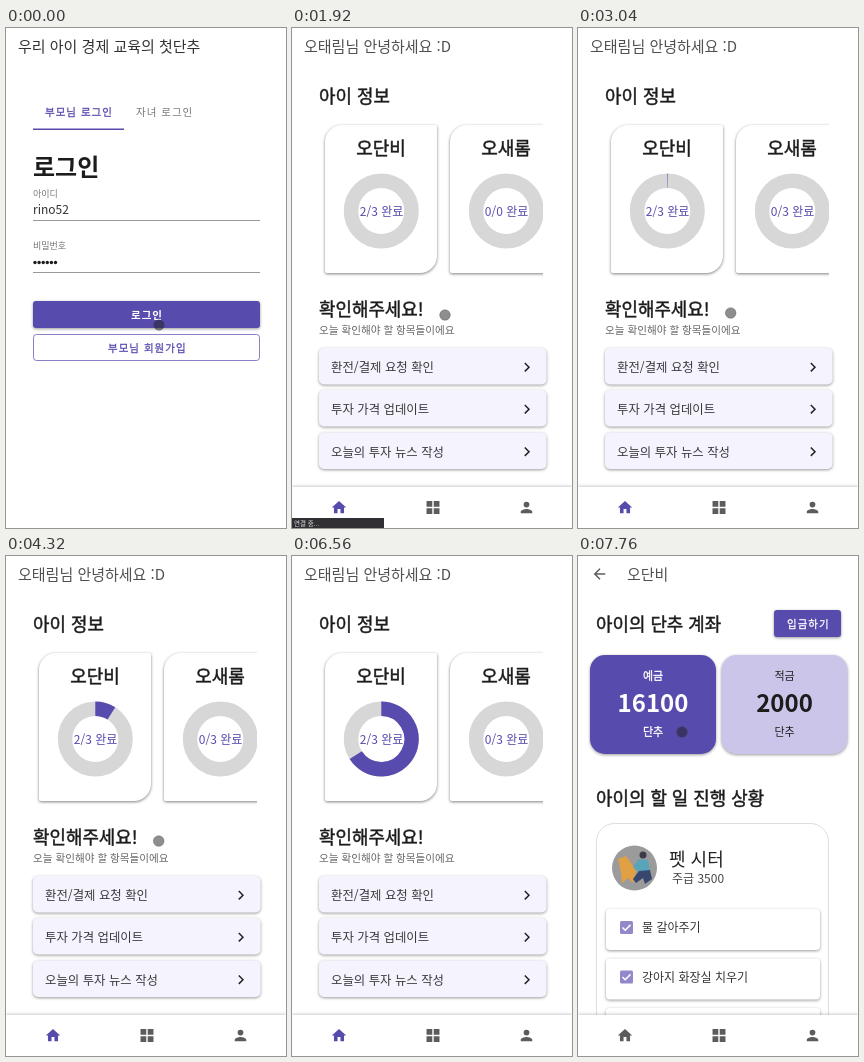
Animation of 280 by 500 pixels, one loop 8000 ms. Source, as an HTML page:

```html
<!DOCTYPE html>
<html lang="ko">
<head>
<meta charset="utf-8">
<style>
  html, body { margin: 0; width: 100%; height: 100%; overflow: hidden; background: #fff; }
  svg { display: block; width: 280px; height: 500px; }
  text { font-family: "Noto Sans CJK KR", "Noto Sans KR", "Noto Sans CJK JP", "Noto Sans CJK", sans-serif; white-space: pre; }
  .sh { filter: drop-shadow(0 1.5px 1.5px rgba(0,0,0,.4)); }
  .card { filter: drop-shadow(.5px 1.6px 1.8px rgba(0,0,0,.5)); }
</style>
</head>
<body>
<svg id="stage" viewBox="0 0 280 500"></svg>
<script>
const LOOP = 8000, PURPLE = '#574bae', INK = '#1c1c1c', GREY = '#5c5c5c';
const stage = document.getElementById('stage');

// Markup helpers; weight 500 is the regular face thickened by a thin stroke
const text = (x, y, size, str, o = {}) => {
  const fill = o.fill || INK, medium = o.w === 500;
  return `<text x="${x}" y="${y}" font-size="${size}" fill="${fill}" font-weight="${medium ? 400 : o.w || 400}"` +
    (medium ? ` stroke="${fill}" stroke-width="${size * .025}"` : '') +
    ` letter-spacing="${o.ls || 0}" text-anchor="${o.mid ? 'middle' : 'start'}"${o.id ? ` id="${o.id}"` : ''}>${str}</text>`;
};
const rect = (x, y, w, h, r, fill, extra = '') =>
  `<rect x="${x}" y="${y}" width="${w}" height="${h}" rx="${r}" fill="${fill}" ${extra}/>`;
const circle = (x, y, r, fill, extra = '') =>
  `<circle cx="${x}" cy="${y}" r="${r}" fill="${fill}" ${extra}/>`;
const path = (d, fill, extra = '') => `<path d="${d}" fill="${fill}" ${extra}/>`;
const group = (id, ...parts) => `<g id="${id}">${parts.join('')}</g>`;
const icon = (x, y, d, fill, id = '') =>
  path(d, fill, `id="${id}" transform="translate(${x - 8.64} ${y - 8.64}) scale(.72)"`);

const title = (x, str, fill = '#505050') => text(x, 23.7, 15, str, { fill });
const heading = (x, y, str) => text(x, y, 17.9, str, { w: 500 });
const label = (x, y, str, fill, w = 500) => text(x, y, 10.5, str, { fill, w, ls: 1 });
const rule = y => rect(27, y, 227, 1, 0, '#999');

const login = () => group('login',
  title(12, '우리 아이 경제 교육의 첫단추', '#333'),
  label(39, 88, '부모님 로그인', PURPLE),
  label(130, 88, '자녀 로그인', '#777', 400),
  rect(27, 100.5, 91, 1.5, 0, PURPLE),
  text(27, 148, 24, '로그인', { w: 700 }),
  text(27, 168.5, 9, '아이디', { fill: '#777' }),
  text(27, 185.5, 12, 'rino52', { fill: '#333' }),
  rule(192),
  text(27, 220.7, 9, '비밀번호', { fill: '#777' }),
  ...Array.from({ length: 6 }, (_, i) => circle(29 + 4.1 * i, 234.5, 1.7, INK)),
  rule(244),
  rect(27, 273, 227, 27, 3, PURPLE, 'class="sh"'),
  label(125, 291, '로그인', '#fff', 700),
  rect(27.5, 306.5, 226, 26, 3, '#fff', `stroke="${PURPLE}" stroke-opacity=".7"`),
  label(102, 324, '부모님 회원가입', PURPLE));

const RING = 30.25, RING_X = 89.3;
const child = (x, name, done, id) =>
  path(`M${x + 17} 97h93a2 2 0 0 1 2 2v129a17 17 0 0 1-17 17h-93a2 2 0 0 1-2-2v-129a17 17 0 0 1 17-17z`, '#fff', 'class="card"') +
  text(x + 56, 126.7, 18, name, { w: 500, mid: 1 }) +
  circle(x + 56.3, 183, RING, 'none', 'stroke="#d7d7d7" stroke-width="14.5"') +
  text(x + 56.5, 188, 12, done, { fill: PURPLE, mid: 1, id });

const todo = (y, str) =>
  rect(27, y, 227.5, 36.5, 5, '#f5f3fe', 'class="sh"') +
  text(39, y + 24.1, 12.4, str, { fill: '#3a3a3a' }) +
  path(`M232.8 ${y + 15}l4.2 4.2-4.2 4.2`, 'none', 'stroke="#222" stroke-width="1.5"');

const home = () => group('home',
  title(12, '오태림님 안녕하세요 :D'),
  heading(27, 75.3, '아이 정보'),
  '<g clip-path="url(#row)">',
  child(33, '오단비', '2/3 완료', 'doneA'),
  child(158, '오새롬', '0/0 완료', 'doneB'),
  path('', 'none', `id="arc" stroke="${PURPLE}" stroke-width="14.5"`),
  '</g>',
  heading(27, 287.5, '확인해주세요!'),
  text(27, 306, 10.6, '오늘 확인해야 할 항목들이에요', { fill: '#666' }),
  todo(320, '환전/결제 요청 확인'),
  todo(362, '투자 가격 업데이트'),
  todo(404.5, '오늘의 투자 뉴스 작성'));

const account = (x, w, name, sum, bg, fill, weight) =>
  rect(x, 99, w, 99, 15, bg, 'class="sh"') +
  text(x + w / 2, 124, 11, name, { fill, w: weight, mid: 1 }) +
  text(x + w / 2, 156, 24, sum, { fill, w: 700, mid: 1 }) +
  text(x + w / 2, 180, 11, '단추', { fill, w: weight, mid: 1 });

const panel = h => rect(18.5, 267.5, 232, h, 18, '#fff', 'stroke="#dedede"');

const task = (y, str) =>
  rect(28, y, 214, 41, 4, '#fff', 'class="sh"') +
  rect(42, y + 12, 13, 13, 1.5, '#9488ca') +
  path(`M44.5 ${y + 18.5}l2.7 2.7 5.3-5.3`, 'none', 'stroke="#fff" stroke-width="1.5"') +
  text(64, y + 23, 12, str, { fill: '#333' });

const avatar = () => circle(56.5, 312, 22.5, '#9b9b9b') +
  path('M40 303l8-3 5 7 5 8-3 12-5-5-6 5-1-11z', '#e2a044') +
  circle(65, 299, 3.5, '#3b3a48') +
  path('M61 303l9 1 2 11-11 1-6-5z', '#58a4b8') +
  path('M61 315l11-1 2 9-7 5-2-6-7 5-3-4z', '#39476f');

const detail = () => group('detail',
  icon(21.5, 18, 'M20 11H7.83l5.59-5.59L12 4l-8 8 8 8 1.41-1.41L7.83 13H20z', GREY),
  title(49, '오단비'),
  heading(18, 74.7, '아이의 단추 계좌'),
  rect(196, 54, 67, 27, 3, PURPLE, 'class="sh"'),
  label(209, 72, '입금하기', '#fff'),
  heading(18, 248.5, '아이의 할 일 진행 상황'),
  group('loading',
    account(12, 257, '예금', '18100', PURPLE, '#fff', 500),
    panel(84),
    circle(56.5, 306.5, 22.5, '#9b9b9b')),
  group('loaded',
    account(12, 126, '예금', '16100', PURPLE, '#fff', 500),
    account(143.5, 126, '적금', '2000', '#cbc6e9', INK, 400),
    panel(260),
    avatar(),
    text(91, 309.5, 18, '펫 시터', { fill: '#222' }),
    text(94, 326.7, 12, '주급 3500', { fill: '#444' }),
    task(353, '물 갈아주기'),
    task(402.5, '강아지 화장실 치우기'),
    rect(28, 452, 214, 41, 4, '#fff', 'class="sh"')));

const nav = () => group('nav',
  rect(0, 459, 280, 41, 0, '#fff', 'style="filter:drop-shadow(0 -.6px 1.6px rgba(0,0,0,.2))"'),
  icon(47, 479.5, 'M10 20v-6h4v6h5v-8h3L12 3 2 12h3v8z', PURPLE, 'homeIcon'),
  icon(141, 479.5, 'M3 3h8v8H3zM13 3h8v8h-8zM3 13h8v8H3zM13 13h8v8h-8z', GREY),
  icon(234.5, 479.5, 'M12 12a4 4 0 1 0 0-8 4 4 0 0 0 0 8zm0 2c-2.67 0-8 1.34-8 4v2h16v-2c0-2.66-5.33-4-8-4z', GREY));

stage.innerHTML =
  '<clipPath id="row"><path d="M0 90h251v165H0z"/></clipPath>' +
  login() + home() + detail() + nav() +
  group('status',
    rect(0, 490, 92, 10, 0, '#303034'),
    text(2, 497.6, 6.5, '', { fill: '#e4e4e4', id: 'statusText' })) +
  circle(0, 0, 5.3, 'rgba(30,30,30,.5)', 'id="cursor" stroke="rgba(60,60,60,.35)"');

const el = id => document.getElementById(id);
const show = (id, on) => el(id).setAttribute('display', on ? 'inline' : 'none');

function drawArc(t) {
  const p = Math.min(1, Math.max(0, (t - 2400) / 3520));
  const a = Math.PI * 2 * .66 * p ** 3.3;
  const x = RING_X + RING * Math.sin(a), y = 183 - RING * Math.cos(a);
  el('arc').setAttribute('d', p ? `M${RING_X} ${183 - RING}A${RING} ${RING} 0 ${a > Math.PI ? 1 : 0} 1 ${x} ${y}` : '');
}

function cursorAt(t) {
  if (t < 480) return [153, 297];
  if (t < 560) return [153, 292];
  if (t < 2480) return [153, 287];
  if (t < 6560) return [152.7, 285];
  return [104, 176];
}

function render(t) {
  const onHome = t >= 1840 && t < 7120, onDetail = t >= 7120, ready = t >= 7440;
  show('login', t < 1840);
  show('home', onHome);
  show('detail', onDetail);
  show('loading', !ready);
  show('loaded', ready);
  show('nav', t >= 1840);
  show('status', (t >= 1840 && t < 2240) || (t >= 7120 && t < 7600));
  el('statusText').textContent = onDetail ? 'mylocal의 응답을 기다리는...' : '연결 중...';
  el('doneB').textContent = t < 2080 ? '0/0 완료' : '0/3 완료';
  el('homeIcon').setAttribute('fill', t < 7520 ? PURPLE : GREY);
  drawArc(t);
  show('cursor', t < 6560 || t >= 6960);
  el('cursor').setAttribute('transform', `translate(${cursorAt(t)})`);
}

const start = performance.now();
function tick() {
  render((performance.now() - start) % LOOP);
  requestAnimationFrame(tick);
}
tick();
</script>
</body>
</html>
```
